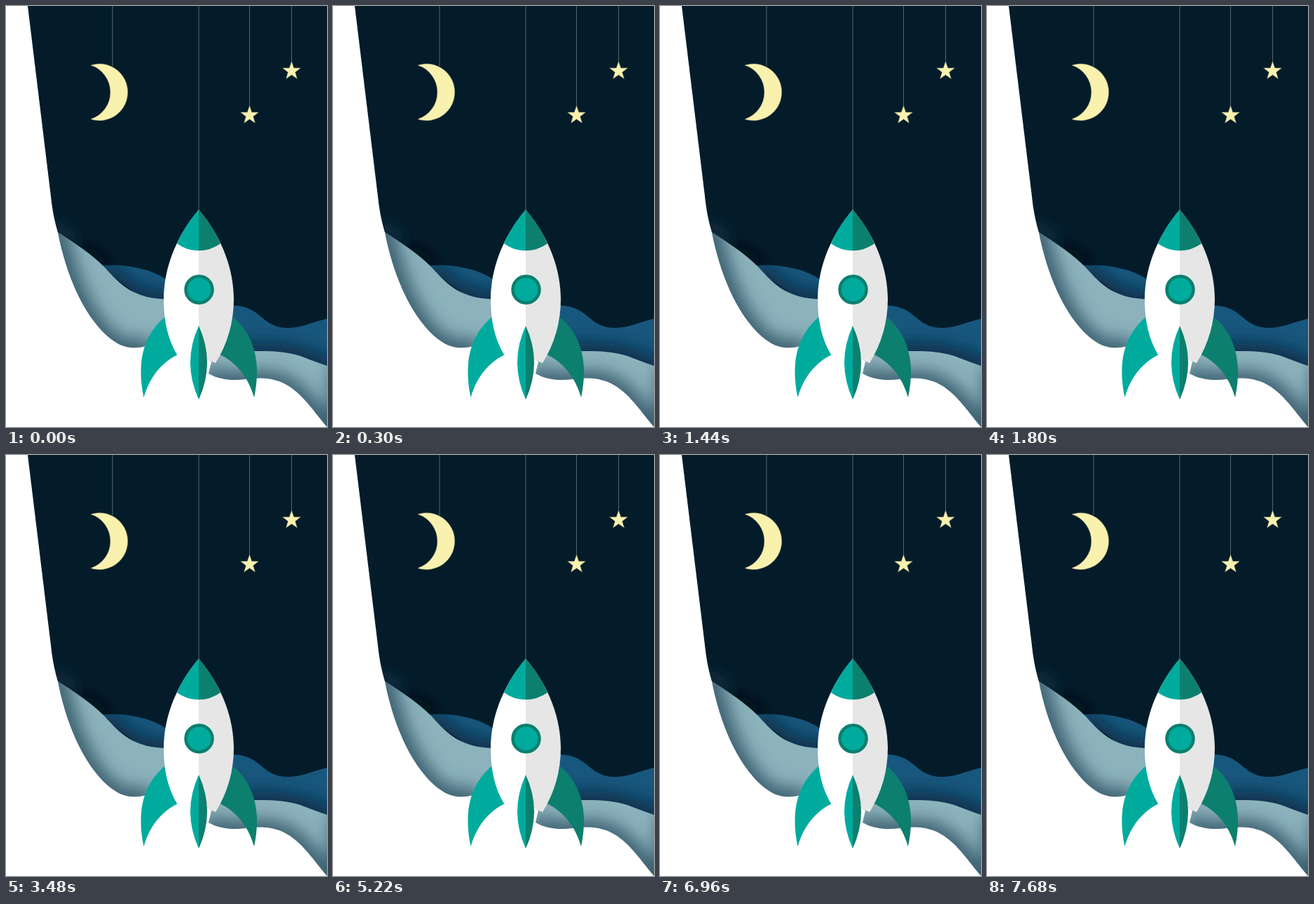
Write an HTML page that moves like this. It is 458 px wide and 599 px high and loops after 8000 ms.

```html
<!DOCTYPE html>
<html lang="en">
<head>
<meta charset="utf-8">
<title>Rocket at night</title>
<style>
  html, body { margin: 0; width: 100%; height: 100%; overflow: hidden; background: #fff; }
  svg { display: block; width: 100vw; height: 100vh; }
</style>
</head>
<body>
<svg viewBox="0 0 458 599" preserveAspectRatio="none">
  <defs>
    <path id="sky" d="M31 0L65.500 283Q68 302 74 322L150 400L300 480H458V0Z"/>
    <path id="ridge" d="M132 370C165 366 204 372 230 390L325 426C366 428 364 458 403 458C422 458 439 449 458 445V514H330L300 480L215 430Z"/>
    <path id="hill" d="M74 322C98 337 122 353 141 372C163 397 184 417 230 417L320 492C366 490 396 490 420 498Q438 505 458 512V599C436 573 419 545 390 534C364 525 348 532 322 532Q303 531 289 523L293 506L240 470Q222 482 200 484C178 489 164 486 145 470C109 438 85 379 74 322Z"/>
    <clipPath id="inSky"><use href="#sky"/></clipPath>
    <clipPath id="inRidge"><use href="#ridge"/></clipPath>
    <clipPath id="inHill"><use href="#hill"/></clipPath>
    <filter id="soft" filterUnits="userSpaceOnUse" x="-50" y="200" width="600" height="500">
      <feGaussianBlur stdDeviation="9"/>
    </filter>
    <filter id="softer" filterUnits="userSpaceOnUse" x="-50" y="200" width="600" height="500">
      <feGaussianBlur stdDeviation="12"/>
    </filter>
    <path id="star" d="M0-13.500L3.200-4.300 12.800-4.200 5.100 1.700 7.900 10.900 0 5.400-7.900 10.900-5.100 1.700-12.800-4.200-3.200-4.300Z"/>
    <path id="fin" d="M226 443C199 466 185 503 196.500 557C205 528 221 508 245 496Z"/>
  </defs>

  <use href="#sky" fill="#041c2a"/>
  <g clip-path="url(#inSky)" fill="none" filter="url(#soft)">
    <path d="M66 314Q84 317 96 333" stroke="#15354a" stroke-width="11"/>
    <path d="M106 344Q126 354 146 366" stroke="#010a12" stroke-width="14"/>
  </g>

  <use href="#ridge" fill="#18577d"/>
  <g clip-path="url(#inRidge)">
    <path d="M136 374C165 401 183 420 230 421L320 496C370 493 398 493 420 501Q438 508 470 518"
      fill="none" stroke="#0b2d48" stroke-width="30" filter="url(#softer)"/>
  </g>

  <use href="#hill" fill="#8cb2bc"/>
  <g clip-path="url(#inHill)" fill="none" stroke="#375c6d" filter="url(#softer)">
    <path d="M68 306C82 379 106 440 142 474C162 492 180 493 208 488" stroke-width="32"/>
    <path d="M284 526Q303 535 322 536C348 537 364 530 390 538C419 549 436 577 470 616" stroke-width="30"/>
    <path d="M474 516V610" stroke-width="24"/>
  </g>

  <path d="M152 0V86M275 0V291M347.500 0V143M407.500 0V80" stroke="#56646d"/>
  <g fill="#f9f1ae" stroke="#a29f7c" stroke-width=".4">
    <path d="M121 84.300A40.300 40.300 0 1 1 121 161A40.300 40.300 0 0 0 121 84.300Z"/>
    <use href="#star" x="407.500" y="92.500"/>
    <use href="#star" x="347.500" y="155.500"/>
  </g>

  <use href="#fin" fill="#00ab9e"/>
  <use href="#fin" fill="#0d7f6e" transform="translate(550.500) scale(-1 1)"/>

  <path d="M275 290C240 331 225 377 225 417Q225 465 244 496L252 508H275Z" fill="#fff"/>
  <path d="M275 290C310 331 325 377 325 417Q325 466 299 508L287 503H275Z" fill="#e6e6e6"/>
  <path d="M275 290Q254 314 244 338Q258 348 275 348Z" fill="#00ab9e"/>
  <path d="M275 290Q296 314 306 338Q292 348 275 348Z" fill="#0d7f6e"/>
  <circle cx="275.500" cy="403.500" r="19" fill="#00ab9e" stroke="#0d7f6e" stroke-width="4.500"/>
  <path d="M275 455Q251 507 275 560Z" fill="#00ab9e"/>
  <path d="M275 455Q299 507 275 560Z" fill="#0d7f6e"/>
</svg>
</body>
</html>
```
